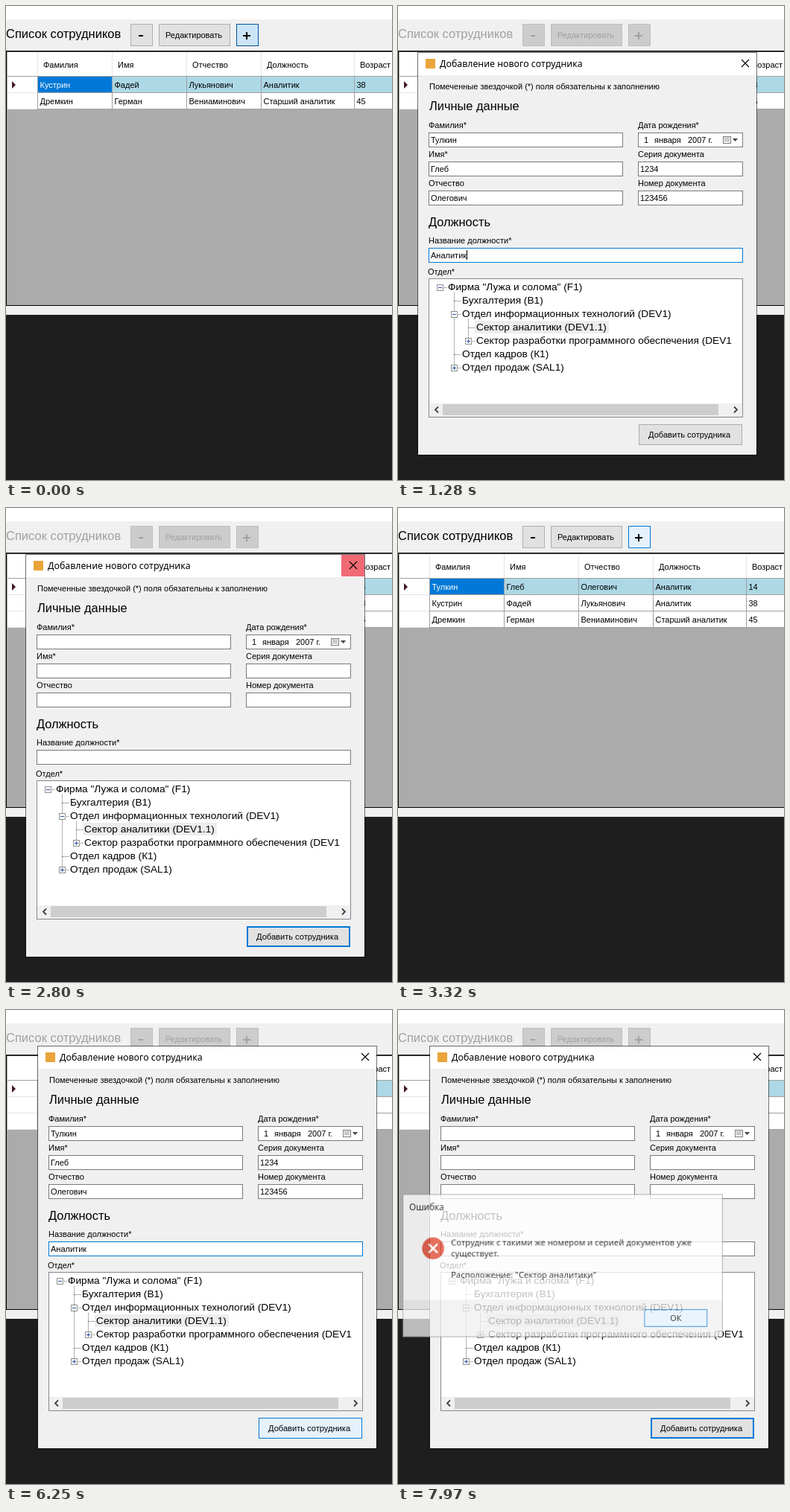
An HTML page with a canvas that plays this animation: 518 by 637 pixels, repeating every 8 s.

```html
<!DOCTYPE html>
<html lang="ru">
<head>
<meta charset="utf-8">
<style>
  html, body { margin: 0; width: 100%; height: 100%; overflow: hidden; background: #1e1e1e; }
  canvas { display: block; }
</style>
</head>
<body>
<canvas id="stage" width="518" height="637"></canvas>
<script>
const W = 518, H = 637, LOOP = 8000, FADE = 120;
const SANS = '"Liberation Sans", Arial, sans-serif', UI = '"Noto Sans", sans-serif';
const screen = document.getElementById('stage').getContext('2d');
const buffer = Object.assign(document.createElement('canvas'), { width: W, height: H }).getContext('2d');
let g = screen;

const clamp = v => Math.max(0, Math.min(1, v));

function rect(x, y, w, h, color) {
  g.fillStyle = color;
  g.fillRect(x, y, w, h);
}
function box(x, y, w, h, fill, border, width = 1) {
  rect(x, y, w, h, border);
  rect(x + width, y + width, w - 2 * width, h - 2 * width, fill);
}
function text(str, x, y, size = 11, color = '#000', font = SANS, align = 'left') {
  g.font = `${size}px ${font}`;
  g.textAlign = align;
  g.fillStyle = color;
  g.fillText(str, x, y);
}
function path(draw, color, width) {
  g.beginPath();
  draw();
  g.strokeStyle = g.fillStyle = color;
  g.lineWidth = width;
  width ? g.stroke() : g.fill();
}
function line(x1, y1, x2, y2, color, width = 1) {
  path(() => { g.moveTo(x1, y1); g.lineTo(x2, y2); }, color, width);
}
function cross(x, y, r, color, width) {
  line(x - r, y - r, x + r, y + r, color, width);
  line(x - r, y + r, x + r, y - r, color, width);
}
// Arrowhead with its tip at (x, y), reaching back by (dx, dy); filled when no width is given
function arrow(x, y, dx, dy, color, width) {
  const sx = dx ? 0 : Math.abs(dy) * .9, sy = dx ? Math.abs(dx) : 0;
  path(() => {
    g.moveTo(x - dx - sx, y - dy - sy);
    g.lineTo(x, y);
    g.lineTo(x - dx + sx, y - dy + sy);
  }, color, width);
}

const BUTTON = {
  normal: ['#e1e1e1', '#adadad'],
  focus: ['#e1e1e1', '#0078d7', 2],
  hover: ['#e5f1fb', '#0078d7'],
  pressed: ['#cce4f7', '#005499'],
  disabled: ['#cccccc', '#bfbfbf']
};
const button = (x, y, w, h, state) => box(x, y, w, h, ...BUTTON[state]);

// Opacity of a window that eases in at "open" and fades out from "close"
function visibility(t, { open, close }) {
  const shown = clamp((t - open) / FADE), gone = clamp((t - close) / FADE);
  return (1 - (1 - shown) ** 2) * (1 - gone);
}

// Draws a window as one translucent sheet, slightly smaller while it fades
function sheet(alpha, cx, cy, draw) {
  if (!alpha) return;
  buffer.clearRect(0, 0, W, H);
  g = buffer;
  draw();
  g = screen;
  const scale = 1 - .06 * (1 - alpha);
  g.save();
  g.globalAlpha = alpha;
  g.translate(cx, cy);
  g.scale(scale, scale);
  g.drawImage(buffer.canvas, -cx, -cy);
  g.restore();
}

// "focus" holds the moment each field is entered, then the moment the last one is finished
const FORMS = [
  {
    x: 27, y: 63, open: 150, close: 2860,
    focus: [230, 470, 640, 900, 970, 1120, 1280],
    hover: 1580, press: 1660, closeHover: 2700,
    message: {
      x: 96, y: 261, w: 250, h: 165, open: 1740, close: 2200, hover: 2110,
      title: 'Успех', icon: '#2478d0', lines: ['Сотрудник успешно добавлен.']
    }
  },
  {
    x: 43, y: 49, open: 3770, close: Infinity,
    focus: [3810, 4470, 4630, 5240, 5310, 5390, 5470],
    hover: 5850, press: 6350, closeHover: Infinity,
    message: {
      x: 3, y: 246, w: 436, h: 195, open: 6430, close: 7942, hover: 7800,
      title: 'Ошибка', icon: '#e0452c', lines: [
        'Сотрудник с такими же номером и серией документов уже', 'существует.', '',
        'Расположение: "Сектор аналитики"'
      ]
    }
  }
];

const COLUMNS = { 'Фамилия': 42, 'Имя': 142, 'Отчество': 242, 'Должность': 342, 'Возраст': 467 };
const STAFF = [
  ['Тулкин', 'Глеб', 'Олегович', 'Аналитик', '14'],
  ['Кустрин', 'Фадей', 'Лукьянович', 'Аналитик', '38'],
  ['Дремкин', 'Герман', 'Вениаминович', 'Старший аналитик', '45']
];

function drawMain(t) {
  const [first, second] = FORMS;
  const disabled = t >= 80 && t < first.close || t >= second.open - 180;
  const ink = disabled ? '#a0a0a0' : '#000';
  const plain = disabled ? 'disabled' : 'normal';
  const plus = disabled ? plain
    : t < first.close || t >= second.open - 290 ? 'pressed'
    : t >= 3320 ? 'hover' : 'focus';
  rect(0, 0, W, 18, '#fff');
  rect(0, 18, W, 397, '#f0f0f0');
  rect(0, 415, W, H - 415, '#1e1e1e');
  text('Список сотрудников', 0, 43, 16.5, ink);
  button(167, 24, 30, 30, plain);
  button(205, 24, 96, 30, plain);
  button(309, 24, 30, 30, plus);
  text('Редактировать', 214, 43, 11, ink);
  rect(178, 39, 6, 2, ink);
  rect(318, 39, 10, 2, ink);
  rect(322, 35, 2, 10, ink);

  box(0, 60, W + 2, 343, '#ababab', '#000');
  rect(1, 61, W, 1, '#555');
  rect(2, 62, W, 32, '#fff');
  // The pointer rests on this header once the window above it is gone
  const glow = t < first.close ? 0 : clamp((3170 - t) / 160);
  rect(343, 63, 124, 31, `rgba(217, 235, 249, ${glow})`);
  rect(2, 94, W, 1, '#a0a0a0');
  for (const [label, x] of Object.entries(COLUMNS)) {
    rect(x, 62, 1, 32, '#e5e5e5');
    text(label, x + 8, 83);
  }
  const staff = t >= first.message.open ? STAFF : STAFF.slice(1);
  staff.forEach((person, row) => {
    const y = 95 + 22 * row;
    rect(2, y, 40, 22, '#fff');
    rect(42, y, W, 22, row ? '#fff' : '#add8e6');
    if (!row) rect(43, y, 99, 21, '#0078d7');
    rect(2, y + 21, 40, 1, '#e5e5e5');
    rect(42, y + 21, W, 1, '#a0a0a0');
    Object.values(COLUMNS).forEach((x, i) => {
      rect(x, y, 1, 22, '#a0a0a0');
      text(person[i], x + 3.5, y + 15, 11, row || i ? '#000' : '#fff');
    });
  });
  arrow(13, 106, 5, 0, '#40142a');
}

const LEFT = { x: 14, w: 261 }, RIGHT = { x: 295, w: 141 }, FULL = { x: 14, w: 422 };
const rowY = row => Math.round(107 + 38.75 * row);
const FIELDS = [
  ['Фамилия*', 'Тулкин', LEFT, 0],
  ['Имя*', 'Глеб', LEFT, 1],
  ['Отчество', 'Олегович', LEFT, 2],
  ['Серия документа', '1234', RIGHT, 1],
  ['Номер документа', '123456', RIGHT, 2],
  ['Название должности*', 'Аналитик', FULL, 4]
];

function drawFields({ focus, press, message }, t) {
  const done = focus[FIELDS.length];
  FIELDS.forEach(([label, value, { x, w }, row], i) => {
    const y = rowY(row), start = focus[i], end = focus[i + 1], last = end === done;
    const active = t >= start && t < (last ? press : end + 100);
    // A short pause, then steady typing, then the move to the next field
    const progress = clamp(((t - start) / (end - start) - .35) / .45);
    const shown = t < message.close ? value.slice(0, Math.ceil(value.length * progress)) : '';
    text(label, x, y - 6);
    box(x, y, w, 20, '#fff', active ? '#0078d7' : '#7a7a7a');
    text(shown, x + 3, y + 14);
    if (t >= start && t < (last ? end + 200 : end))
      rect(Math.round(x + 3 + g.measureText(shown).width), y + 3, 1, 13, '#000');
  });
}

function drawDate() {
  const { x, w } = RIGHT, y = rowY(0);
  text('Дата рождения*', x, y - 6);
  box(x, y, w, 20, '#fff', '#7a7a7a');
  text('1', x + 8, y + 14);
  text('января', x + 22, y + 14);
  text('2007 г.', x + 67, y + 14);
  box(x + 114, y + 5, 11, 10, '#fff', '#777');
  for (let i = 0; i < 3; i++) rect(x + 116, y + 7 + 2 * i, 7, 1, '#999');
  arrow(x + 130.5, y + 12, 0, 4, '#444');
}

// Leading dots give the depth, then the expander sign if there is one
const TREE = [
  '-Фирма "Лужа и солома" (F1)',
  '.Бухгалтерия (B1)',
  '.-Отдел информационных технологий (DEV1)',
  '..Сектор аналитики (DEV1.1)',
  '..+Сектор разработки программного обеспечения (DEV1',
  '.Отдел кадров (К1)',
  '.+Отдел продаж (SAL1)'
];

function drawTree() {
  box(14, 303, 422, 187, '#fff', '#828790');
  rect(76, 360, 180, 17, '#ededed');
  g.setLineDash([1, 1]);
  line(48.5, 322, 48.5, 423, '#666');
  line(67.5, 358, 67.5, 387, '#666');
  g.setLineDash([]);
  TREE.forEach((entry, i) => {
    const [, dots, sign, label] = entry.match(/^(\.*)([-+]?)(.*)/);
    const x = 29 + 19 * dots.length, y = 315 + 18 * i;
    g.setLineDash([1, 1]);
    line(x, y + .5, x + 9, y + .5, '#666');
    g.setLineDash([]);
    if (sign) {
      box(x - 4, y - 4, 9, 9, '#fff', '#919191');
      rect(x - 2, y, 5, 1, '#3050a0');
      if (sign === '+') rect(x, y - 2, 1, 5, '#3050a0');
    }
    text(label, x + 11, y + 4, 13.7);
  });
  rect(15, 471, 420, 18, '#f0f0f0');
  rect(33, 472, 370, 15, '#cdcdcd');
  arrow(23, 479.5, -4, 0, '#404040', 1.8);
  arrow(428, 479.5, 4, 0, '#404040', 1.8);
}

function drawForm(form, t) {
  const { hover, press, message } = form;
  const inactive = t >= message.open && t < message.close;
  const ink = inactive ? '#999' : '#000';
  const add = t >= press + 80 ? 'focus' : t >= press ? 'pressed' : t >= hover ? 'hover' : 'normal';
  g.save();
  g.translate(form.x, form.y);
  rect(-1, -1, 456, 542, `rgba(0, 0, 0, ${inactive ? .3 : .55})`);
  rect(0, 0, 454, 540, '#f0f0f0');
  rect(0, 0, 454, 30, '#fff');
  rect(10, 8, 13, 13, '#e9a43a');
  text('Добавление нового сотрудника', 29, 19, 12.3, ink, UI);
  if (t >= form.closeHover) rect(423, 0, 31, 29, '#f06a74');
  cross(439, 14, 5, ink, 1.1);

  text('Помеченные звездочкой (*) поля обязательны к заполнению', 15, 49);
  text('Личные данные', 15, 77, 16.4);
  text('Должность', 14, 233, 16.4);
  drawFields(form, t);
  drawDate();
  text('Отдел*', 13, 298);
  drawTree();
  button(296, 499, 139, 28, add);
  text('Добавить сотрудника', 309, 517, 11.1);
  g.restore();
}

function drawMessage({ x, y, w, h, title, icon, lines, hover }, t) {
  box(x, y, w, h, '#fff', '#999');
  rect(x + 1, y + h - 51, w - 2, 50, '#f0f0f0');
  text(title, x + 9, y + 22, 11.8, '#000', UI);
  const cx = x + 41.5, cy = y + 74;
  path(() => g.arc(cx, cy, 15, 0, 7), icon);
  if (lines.length > 1) cross(cx, cy, 6, '#fff', 2.5);
  else {
    line(cx, cy - 8, cx, cy - 5, '#fff', 3);
    line(cx, cy - 2, cx, cy + 8, '#fff', 3);
  }
  lines.forEach((str, i) => text(str, x + 66, y + 70 + 14.8 * i, 11.33, '#000', UI));
  button(x + w - 107, y + h - 38, 86, 24, t >= hover ? 'hover' : 'focus');
  text('ОК', x + w - 64, y + h - 22, 11, '#000', UI, 'center');
}

function frame() {
  const t = performance.now() % LOOP;
  drawMain(t);
  for (const form of FORMS) {
    const { message } = form;
    sheet(visibility(t, form), form.x + 227, form.y + 270, () => drawForm(form, t));
    sheet(visibility(t, message), 221, 343, () => drawMessage(message, t));
  }
  requestAnimationFrame(frame);
}
frame();
</script>
</body>
</html>
```
